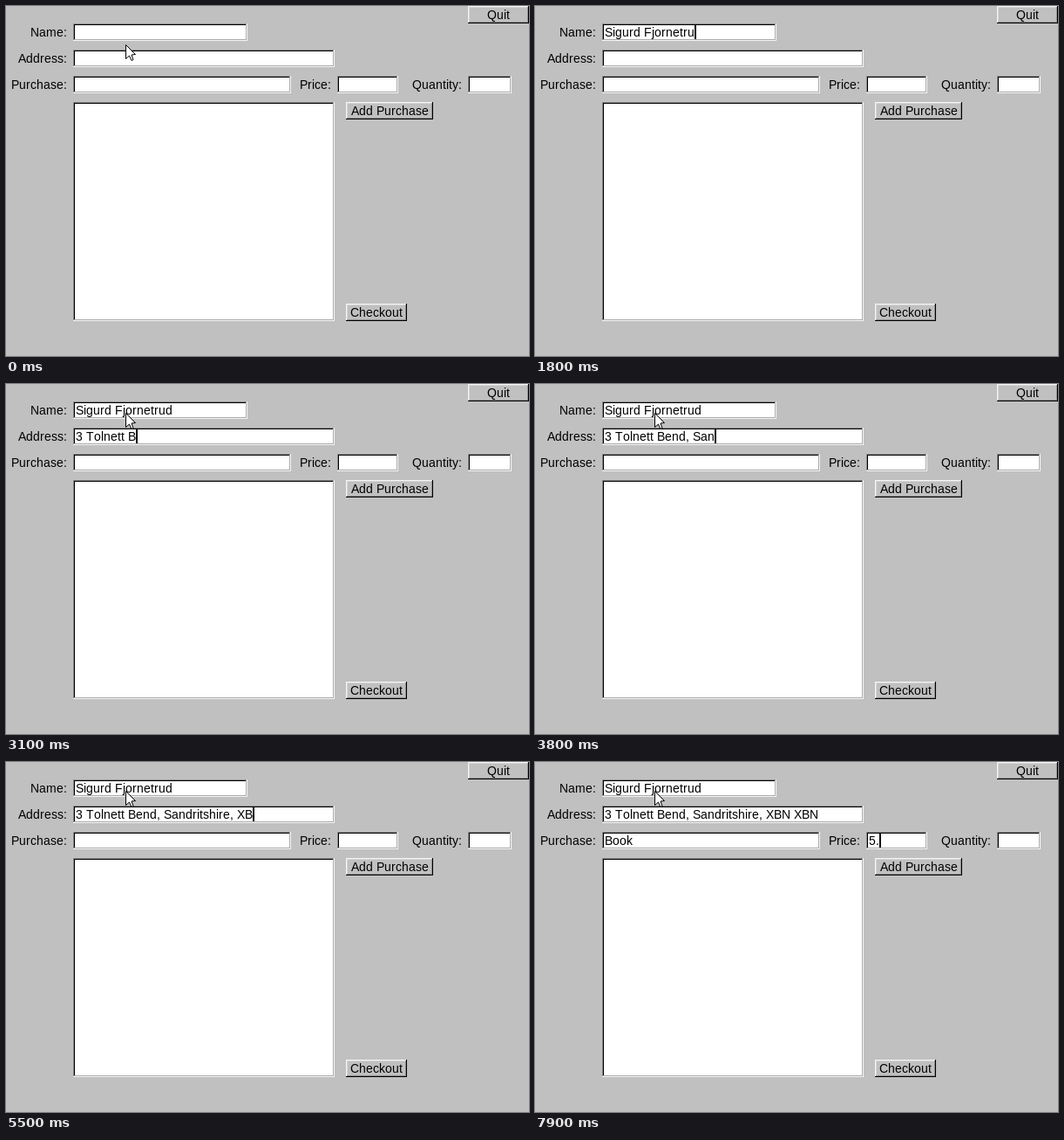
An HTML page with a canvas for the animation above (8 s loop, 600x401 px).

```html
<!DOCTYPE html>
<html lang="en">
<head>
<meta charset="utf-8">
<title>Purchase form</title>
<style>
  html, body { margin: 0; width: 100%; height: 100%; overflow: hidden; background: #c0c0c0; }
  canvas { display: block; }
</style>
</head>
<body>
<canvas id="stage" width="600" height="401"></canvas>
<script>
const LOOP = 8000, STEP = 100;
const ctx = document.getElementById('stage').getContext('2d');

// bursts: [start ms, end ms, letters at start, letters at end]
const fields = [
  { label: 'Name:', x: 77, y: 20, w: 200, text: 'Sigurd Fjornetrud', focus: [200, 2100],
    bursts: [[600, 1400, 1, 12], [1500, 1900, 13, 17]] },
  { label: 'Address:', x: 77, y: 50, w: 300, text: '3 Tolnett Bend, Sandritshire, XBN XBN', focus: [2100, 6600],
    bursts: [[2400, 3100, 1, 11], [3300, 4000, 12, 22], [4300, 4700, 23, 28],
             [4900, 5100, 29, 31], [5300, 6000, 32, 35], [6200, 6400, 36, 37]] },
  { label: 'Purchase:', x: 77, y: 80, w: 250, text: 'Book', focus: [6600, 7400],
    bursts: [[6900, 7200, 1, 4]] },
  { label: 'Price:', x: 380, y: 80, w: 70, text: '5.', focus: [7400, 8000],
    bursts: [[7800, 7900, 1, 2]] },
  { label: 'Quantity:', x: 530, y: 80, w: 50, text: '', focus: [0, 0], bursts: [] }
];

const buttons = [
  ['Quit', 530, 0, 70],
  ['Add Purchase', 390, 110, 100],
  ['Checkout', 390, 341, 70]
];

function fill(color, x, y, w, h) {
  ctx.fillStyle = color;
  ctx.fillRect(x, y, w, h);
}

// Two-pixel bevel: outer and inner pairs of [bottom-right, top-left] colours
function bevel(x, y, w, h, face, pairs) {
  for (const [low, high] of pairs) {
    fill(low, x, y, w, h);
    fill(high, x, y, w - 1, h - 1);
    x++; y++; w -= 2; h -= 2;
  }
  fill(face, x, y, w, h);
}
const sunken = (x, y, w, h) =>
  bevel(x, y, w, h, '#fff', [['#f5f5f5', '#8a8a8a'], ['#ababab', '#000']]);
const raised = (x, y, w, h) =>
  bevel(x, y, w, h, '#c0c0c0', [['#000', '#f5f5f5'], ['#8a8a8a', '#d5d5d5']]);

// Letters advance by whole pixels, as in hinted screen text
const advance = ch => Math.round(ctx.measureText(ch).width);
const width = str => [...str].reduce((sum, ch) => sum + advance(ch), 0);

function write(str, x, y) {
  ctx.fillStyle = '#000';
  for (const ch of str) {
    ctx.fillText(ch, x, y);
    x += advance(ch);
  }
  return x;
}

function typed(bursts, t) {
  let count = 0;
  for (const [start, end, from, to] of bursts) {
    if (t < start) break;
    const k = Math.min(1, (t - start) / (end - start));
    count = Math.floor(from + (to - from) * k + 1e-6);
  }
  return count;
}

function pointer(x, y) {
  ctx.save();
  ctx.translate(x + 0.5, y + 0.5);
  ctx.beginPath();
  for (const [px, py] of [[0, 0], [0, 16], [4, 12.5], [6.5, 18], [8.5, 17], [6.5, 11.5], [11, 11]])
    ctx.lineTo(px, py);
  ctx.closePath();
  ctx.fillStyle = '#fff';
  ctx.fill();
  ctx.strokeStyle = '#000';
  ctx.stroke();
  ctx.restore();
}

function draw(t) {
  fill('#c0c0c0', 0, 0, 600, 401);
  ctx.font = '14px "Liberation Sans", Arial, sans-serif';

  sunken(77, 110, 300, 251);
  for (const [label, x, y, w] of buttons) {
    raised(x, y, w, 20);
    write(label, x + Math.round((w - width(label)) / 2), y + 15);
  }
  for (const f of fields) {
    write(f.label, f.x - 7 - width(f.label), f.y + 15);
    sunken(f.x, f.y, f.w, 20);
    const end = write(f.text.slice(0, typed(f.bursts, t)), f.x + 3, f.y + 15);
    if (t >= f.focus[0] && t < f.focus[1]) fill('#000', end, f.y + 2, 2, 16);
  }

  // The pointer hides while typing in the field below it
  if (t < 600 || t >= 2100) pointer(137, t < 100 ? 44 : 33);
}

const begin = performance.now();
function frame() {
  const t = (performance.now() - begin) % LOOP;
  draw(Math.floor(t / STEP) * STEP);
  requestAnimationFrame(frame);
}
frame();
</script>
</body>
</html>
```
